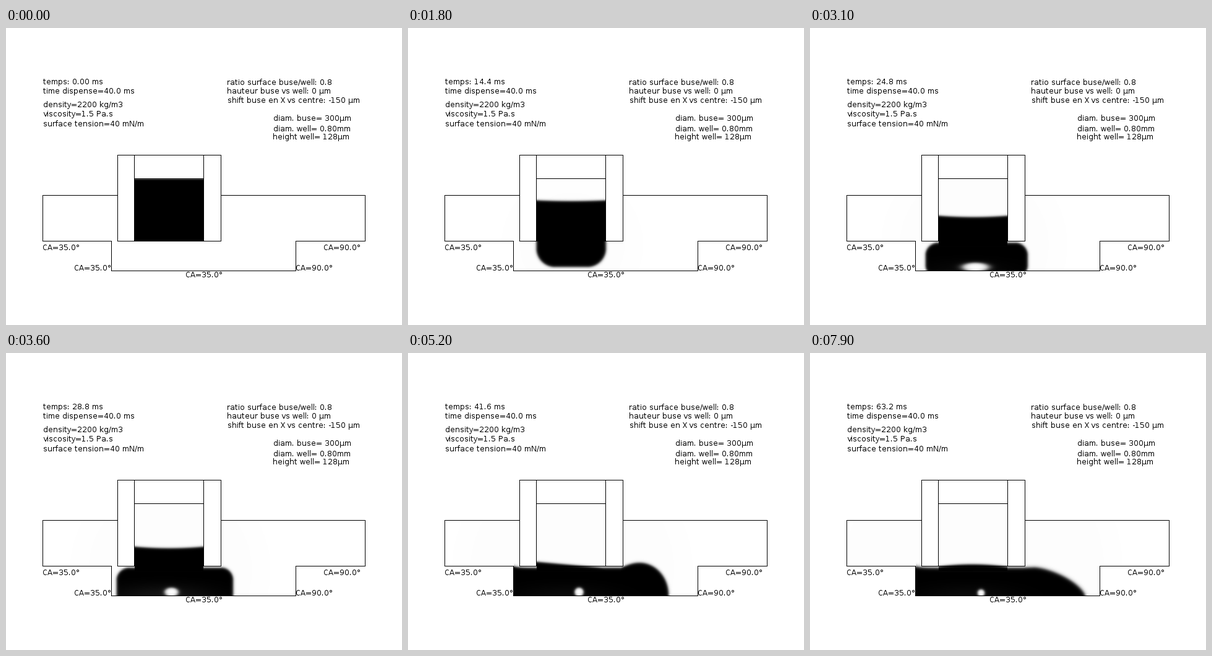
A matplotlib script that plays this animation: 640 by 480 pixels, repeating every 8 s.

```python
import matplotlib.pyplot as plt
import numpy as np
from matplotlib.animation import FuncAnimation

W, H, DPI = 640, 480, 80
FRAMES, INTERVAL = 80, 100
STEP_MS = 0.8                                # simulated time per frame
TOUCH, CONTACT, EMPTY, SETTLE = 18, 27, 50.5, 52
plt.rcParams.update({"font.family": "DejaVu Sans", "text.hinting": "default",
                     "text.hinting_factor": 1})

LABELS = [
    (60, 106, "time dispense=40.0 ms"),
    (60, 128, "density=2200 kg/m3"),
    (60, 143, "viscosity=1.5 Pa.s"),
    (60, 159, "surface tension=40 mN/m"),
    (357, 92, "ratio surface buse/well: 0.8"),
    (357, 106, "hauteur buse vs well: 0 µm"),
    (358, 121, "shift buse en X vs centre: -150 µm"),
    (432, 150, "diam. buse= 300µm"),
    (432, 167, "diam. well= 0.80mm"),
    (431, 180, "height well= 128µm"),
    (59, 359, "CA=35.0°"),
    (110, 392, "CA=35.0°"),
    (290, 403, "CA=35.0°"),
    (468, 392, "CA=90.0°"),
    (513, 359, "CA=90.0°"),
]

# Geometry, in pixels
TANK_L, TANK_R, TANK_T = 59, 580, 270
WELL_L, WELL_R, RIM, BED = 170, 468, 344, 392
OUT_L, OUT_R, BORE_L, BORE_R = 180, 347, 207, 319
NOZZLE_T, FILL_T, MID = 205, 243, 264

Y, X = np.mgrid[0:H, 0:W]
PX, PY = X + 0.5, Y + 0.5


def between(v, a, b):
    return (v > a) & (v < b)


IN_BORE = between(X, BORE_L, BORE_R)
BORE = IN_BORE & between(Y, FILL_T, RIM)
NOZZLE = between(X, OUT_L - 1, OUT_R + 1) & between(Y, NOZZLE_T - 1, RIM + 1)
TANK = between(X, TANK_L, TANK_R) & between(Y, TANK_T, RIM + 1)
WELL = between(X, WELL_L, WELL_R) & between(Y, RIM, BED)
OPEN = (TANK | WELL) & ~NOZZLE & between(X, WELL_L, WELL_R)
AIR = ((TANK | WELL) & ~NOZZLE) | BORE

LINES = np.zeros((H, W), bool)


def trace(*pts):
    """Mark a one-pixel path of horizontal and vertical strokes."""
    for (x0, y0), (x1, y1) in zip(pts, pts[1:]):
        LINES[min(y0, y1):max(y0, y1) + 1, min(x0, x1):max(x0, x1) + 1] = True


trace((OUT_L, TANK_T), (TANK_L, TANK_T), (TANK_L, RIM), (WELL_L, RIM),
      (WELL_L, BED), (WELL_R, BED), (WELL_R, RIM), (TANK_R, RIM),
      (TANK_R, TANK_T), (OUT_R, TANK_T))
trace((OUT_L, NOZZLE_T), (OUT_R, NOZZLE_T), (OUT_R, RIM), (OUT_L, RIM),
      (OUT_L, NOZZLE_T))
trace((BORE_L, NOZZLE_T), (BORE_L, RIM))
trace((BORE_R, NOZZLE_T), (BORE_R, RIM))
trace((BORE_L, FILL_T), (BORE_R, FILL_T))


def sigmoid(v):
    return 1 / (1 + np.exp(-np.clip(v, -40, 40)))


def ramp(f, a, b):
    return float(np.clip((f - a) / (b - a), 0, 1))


def relax(f):
    """0 while dispensing, then easing out to 1 as the drop settles."""
    return 1 - np.exp(-max(0, f - SETTLE) / 9)


def column(f):
    """Liquid left in the nozzle, below its meniscus."""
    fed, r, swing = min(f, EMPTY), relax(f), ramp(f, 40, SETTLE)
    u = (PX - MID) / 56
    top = (FILL_T + 1 + 1.95 * fed
           + 0.07 * fed * (0.5 - u ** 2) * (1 - swing)
           + 5 * u * swing * (1 - r)
           + r * (4 * u ** 2 - 1))
    return sigmoid((PY - top) / (0.6 + 0.5 * ramp(f, 0, 4)))


def pool(f, col):
    """Liquid below the nozzle: a box with superelliptic corners."""
    r, swing = relax(f), ramp(f, 40, SETTLE)
    spread = np.clip(f - TOUCH, 0, SETTLE - TOUCH)
    depth = 44 * np.sin(np.pi / 2 * ramp(f, 0, 22))
    left = BORE_L + 0.5 - 1.6 * spread
    right = BORE_R + 1 + 1.47 * spread ** 1.2 + 25 * r
    bottom = RIM + depth + 4 * max(0, f - CONTACT)

    # The drop detaches from the bore wall, then swells beside the nozzle.
    base = 322 + 25 * ramp(f, TOUCH, 24)
    swell = 8 * swing * (1 - 0.95 * r) * np.sin(
        np.pi / 2 * np.clip((PX - OUT_R + 3) / 30, 0, 1))
    wetting = 3 * swing * np.exp(-np.clip(PX - WELL_L, 0, None) / 8)
    top = base - swell - wetting

    stops = [9, TOUCH, 26, 36, SETTLE]
    rx_l = np.interp(f, stops[:3], [56, 30, 21])
    rx_r = np.interp(f, stops, [56, 30, 21, 19, 47]) + 38 * r
    ry_top = np.where(PX < MID, 20, np.interp(f, stops[2:], [21, 20, 52]) - 5 * r)
    ry_low = max(1, min(depth, rx_l))

    rx = np.where(PX < MID, rx_l, rx_r)
    dx = np.maximum(left + rx_l - PX, PX - right + rx_r).clip(0) / rx
    up = (top + ry_top - PY) / ry_top
    down = (PY - bottom + ry_low) / ry_low
    ry = np.where(up > down, ry_top, ry_low)
    dy = np.maximum(up, down).clip(0)

    n = 2 - 0.5 * r
    rho = (dx ** n + dy ** n) ** (1 / n) + 1e-6
    slope = np.hypot(dx ** (n - 1) / rx, dy ** (n - 1) / ry) / rho ** (n - 1)
    shade = sigmoid((1 - rho) / (slope + 1e-3) / (1.2 + 0.3 * r))
    neck = np.where(IN_BORE & (PY < base + 5), col, 0)
    return np.maximum(shade, neck) * ramp(f, 0, 2)


def bubble(f):
    """Air trapped on the bed, pulled round by surface tension."""
    r = relax(f)
    ry = 7 - 1.5 * r
    rx = ry + 40 * np.exp(-max(0, f - CONTACT) / 3.8)
    cx = 267.5 + 9 * ramp(f, 36, SETTLE)
    rho = np.hypot((PX - cx) / rx, (PY - 386.5 - 1.5 * r) / ry)
    return ramp(f, CONTACT, CONTACT + 3) * sigmoid((1 - rho) * ry / 1.2)


def stage(f):
    col = column(f)
    dark = np.where(BORE, col, np.where(OPEN, pool(f, col) * (1 - bubble(f)), 0))
    halo = np.clip(27 * np.sqrt(f) - np.hypot(X - 265, Y - 350), 0, 60) / 30
    tint = (20 * ramp(f, 28, 36) - 10 * ramp(f, 36, SETTLE)) * np.exp(
        -((Y - BED) / 18) ** 2 - ((X - 255) / 80) ** 2)
    air = 255 - np.where(AIR, np.ceil(halo), 0)
    return np.where(LINES, 0, air * (1 - dark) + tint * dark)


fig = plt.figure(figsize=(W / DPI, H / DPI), dpi=DPI, facecolor="white")
ax = fig.add_axes([0, 0, 1, 1])
ax.axis("off")
picture = ax.imshow(stage(0), cmap="gray", vmin=0, vmax=255, aspect="auto",
                    extent=(0, W, H, 0), interpolation="nearest")
ax.set(xlim=(0, W), ylim=(H, 0))


def label(x, y, s):
    return ax.text(x, y, s, size=12 * 72 / DPI, color="black", va="baseline")


for item in LABELS:
    label(*item)
clock = label(60, 91, "")


def update(f):
    t = f * STEP_MS
    clock.set_text(f"temps: {t:.2f} ms" if t < 10 else f"temps: {t:.1f} ms")
    picture.set_data(stage(f))
    return picture, clock


anim = FuncAnimation(fig, update, frames=FRAMES, interval=INTERVAL,
                     repeat=True, repeat_delay=0)
plt.show()
```
